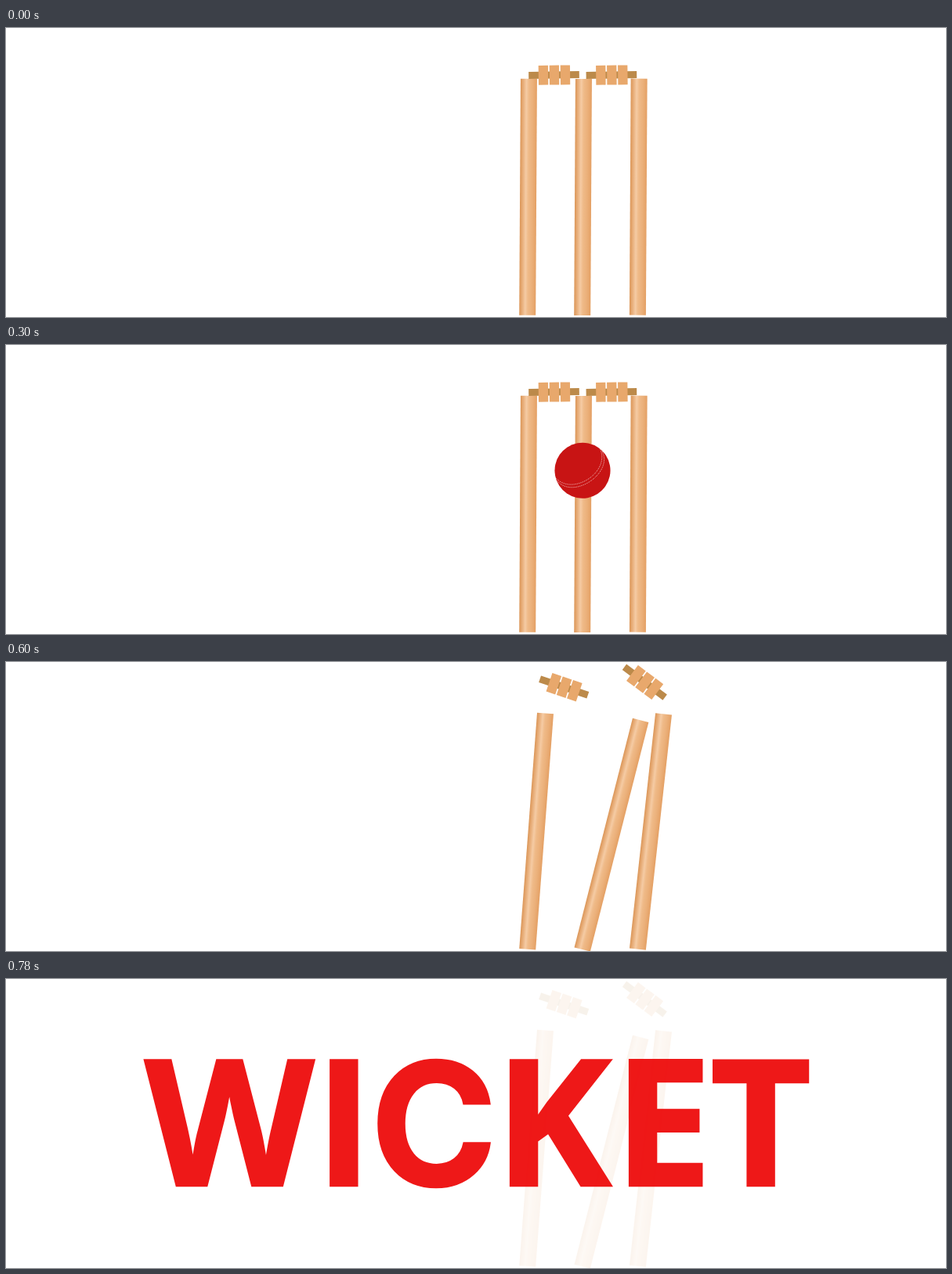
Recreate the animation shown at these times as an HTML page. Size 1200 by 369 pixels, loop 800 ms.

```html
<!DOCTYPE html>
<html lang="en">
<head>
<meta charset="utf-8">
<title>Wicket</title>
<style>
  html, body { margin: 0; width: 100%; height: 100%; overflow: hidden; background: #fff; }
  svg { display: block; }
  text {
    font: 700 224px "Open Sans", sans-serif;
    text-anchor: middle;
    fill: #ed0000;
    stroke: #ed0000;
    stroke-width: 2.5px;
  }
  /* Rounder C with level terminals */
  .round { font: 700 218px Inter, sans-serif; }
  .seam { fill: none; stroke: #fff; stroke-width: .8; stroke-dasharray: 1 1; opacity: .8; }
</style>
</head>
<body>
<svg width="1200" height="369" viewBox="0 0 1200 369">
  <defs>
    <linearGradient id="wood">
      <stop offset="0" stop-color="#db9658"/>
      <stop offset=".14" stop-color="#e6aa74"/>
      <stop offset=".36" stop-color="#f5cba4"/>
      <stop offset=".52" stop-color="#efba88"/>
      <stop offset=".75" stop-color="#ebb07a"/>
      <stop offset="1" stop-color="#e4a064"/>
    </linearGradient>
    <rect id="stump" x="-10.5" y="-302" width="21" height="302" fill="url(#wood)"/>
    <g id="bail">
      <path d="M-32.3-4.5h64.6v9h-64.6z" fill="#bc8a4a"/>
      <path d="M-19.7-12.3h12.3v24.8h-12.3zM-5.7-12.3h12.3v24.8h-12.3zM8.3-12.3h12.3v24.8h-12.3z" fill="#e8a86c"/>
    </g>
  </defs>
  <g id="wicket">
    <use class="stump" href="#stump"/>
    <use class="stump" href="#stump"/>
    <use class="stump" href="#stump"/>
    <use class="bail" href="#bail"/>
    <use class="bail" href="#bail"/>
  </g>
  <g id="ball">
    <circle r="37.2" fill="#c81414"/>
    <path class="seam" d="M-36 7C-32-26 32-26 36 7"/>
    <path class="seam" d="M-35.4 11C-30-22 30-22 35.4 11"/>
  </g>
  <text id="word" x="-314.8 -168.7 -54 98.5 238.8 363.7" y="70.8">WI<tspan class="round">C</tspan>KET</text>
</svg>
<script>
const LOOP = 800, STEP = 20, HIT = 300;
const $ = id => document.getElementById(id);
const stumps = document.querySelectorAll('.stump');
const bails = document.querySelectorAll('.bail');

// Pivot x, pivot y, final lean
const leans = [[665.7, 366.7, 4.33], [735.7, 367, 14.27], [806.4, 366.6, 6.3]];
// Start and end pose: x, y, angle
const flights = [
  [[699.5, 60, -.7], [712.2, 32, 18.6]],
  [[772.9, 60, -.7], [815.3, 25.7, 36.8]]
];
// Time, x, y, radius scale
const ballPath = [[0, 179, 120, 1.09], [200, 538, 334, 1], [HIT, 736, 160.2, .955], [600, 938.5, 141, .955]];

const mix = (a, b, p) => a + (b - a) * p;
const part = (t, from, to) => Math.min(1, Math.max(0, (t - from) / (to - from)));
const pose = (el, x, y, angle, scale = 1) =>
  el.setAttribute('transform', `translate(${x} ${y}) rotate(${angle}) scale(${scale})`);

function along(path, t) {
  let i = 1;
  while (i < path.length - 1 && t > path[i][0]) i++;
  const a = path[i - 1], b = path[i], p = part(t, a[0], b[0]);
  return a.map((v, k) => mix(v, b[k], p));
}

function draw(t) {
  const lean = part(t, HIT, 400), fly = part(t, HIT, 600), fade = part(t, 600, LOOP);

  leans.forEach(([x, y, end], i) => pose(stumps[i], x, y, mix(.33, end, lean)));
  flights.forEach(([a, b], i) => pose(bails[i], ...a.map((v, k) => mix(v, b[k], fly))));
  $('wicket').setAttribute('opacity', 1 - fade);

  const [, x, y, scale] = along(ballPath, t);
  pose($('ball'), x, y, 147 - 1.2 * Math.max(0, HIT - t), scale);
  $('ball').setAttribute('opacity', part(t, 0, 100) * (1 - part(t, 500, 600)));

  pose($('word'), 600, 193, 0, mix(.438, 1.0624, fade));
  $('word').setAttribute('opacity', fade);
}

function tick() {
  draw(Math.floor(performance.now() % LOOP / STEP) * STEP);
  requestAnimationFrame(tick);
}
tick();
</script>
</body>
</html>
```
